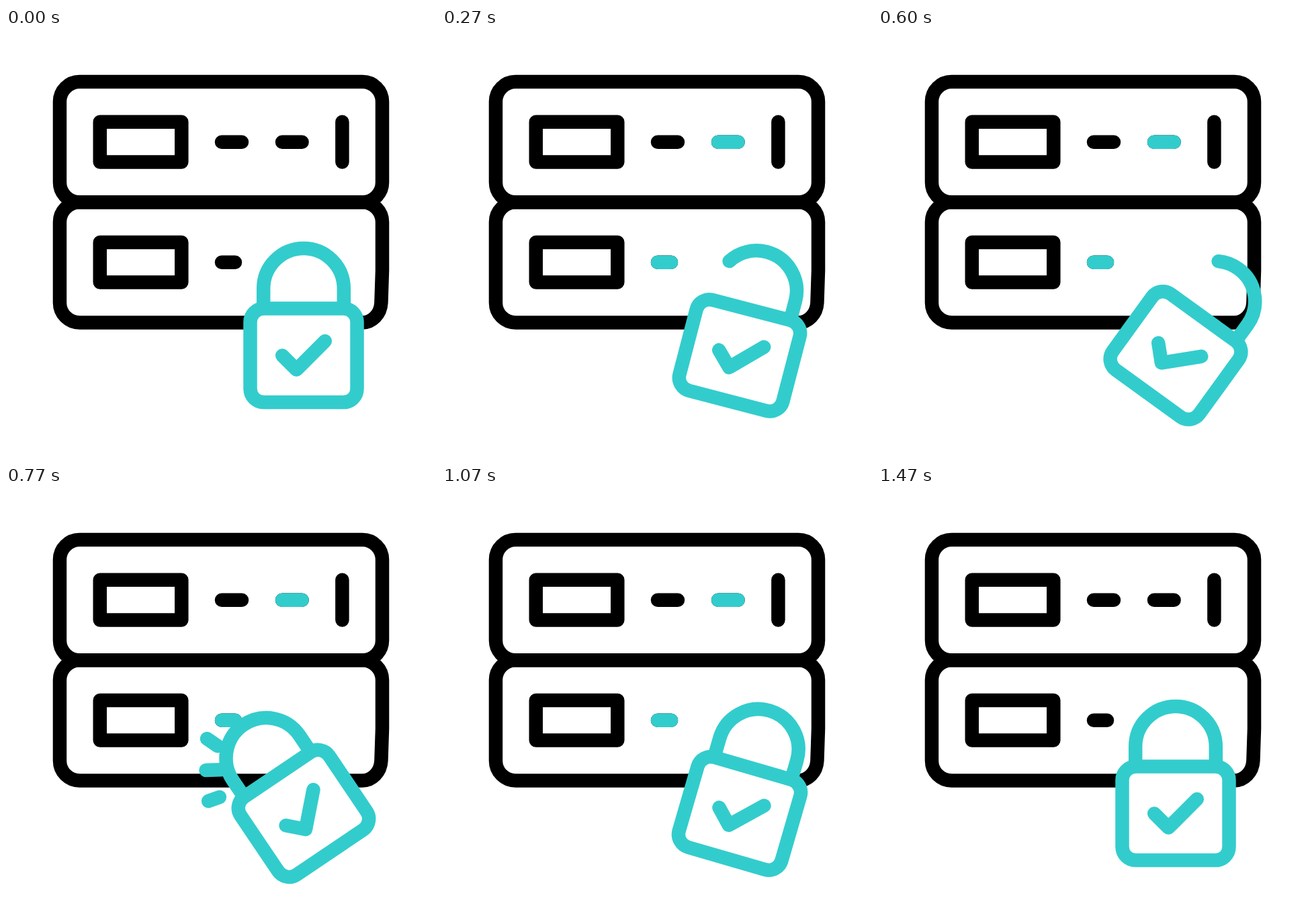
Write an HTML page that moves like this. It is 640 by 640 pixels and loops after 1.67 s.

```html
<!DOCTYPE html>
<html lang="en">
<head>
<meta charset="utf-8">
<title>Secure server</title>
<style>
  html, body { margin: 0; width: 100%; height: 100%; overflow: hidden; background: #fff; }
  svg { display: block; width: 100%; height: 100%; }
  g, path { fill: none; stroke-width: 20.5; stroke-linecap: round; stroke-linejoin: round; }
  .ink { stroke: #000; }
  .teal { stroke: #3cc; }
</style>
</head>
<body>
<svg viewBox="0 0 640 640">
  <g class="ink">
    <rect x="80" y="80" width="480" height="179.3" rx="29.5"/>
    <path d="M530.5 259.3H109.5A29.5 29.5 0 0 0 80 288.8V409A29.5 29.5 0 0 0 109.5 438.5H530
             C545 438.5 557.5 426 558.4 409L560 361V288.8A29.5 29.5 0 0 0 530.5 259.3Z"/>
    <rect x="139.8" y="139.8" width="121.5" height="59.6"/>
    <rect x="139.8" y="319" width="121.5" height="59.6"/>
    <path d="M321 169.7H351M411 169.7H440.6M500.4 139.8V199.4M321 348.8H341"/>
  </g>
  <path id="lights" class="teal" d="M411 169.7H440.6M321 348.8H341"/>
  <g id="sparks" class="teal"></g>
  <g id="lock" class="teal">
    <path id="shackle" d="M59.8-70V-99.5A59.8 59.8 0 0 0-59.8-99.5V-70"/>
    <rect x="-79.5" y="-69.8" width="159" height="139.5" rx="20" fill="#fff"/>
    <path d="M-31.8 0L-10.7 21.2L31.8-21.3"/>
  </g>
</svg>
<script>
const LOOP = 1670, STEP = 100 / 3, LAST = 42;
const $ = id => document.getElementById(id);
const lights = $('lights'), lock = $('lock'), shackle = $('shackle');
const shackleLen = shackle.getTotalLength();

// [step, value] pairs, eased in and out between neighbours
const swing = [[0, 0], [15, 41.5], [21, -34], [30, 16.2], [36, -7], [42, 0]];
const opening = [[0, 0], [10, 0.4], [15, 0.4], [21, 0]];
const sparkHead = [[19, 0], [24, 1]];
const sparkTail = [[21, 0], [27, 1]];

function ease(keys, k) {
  if (k <= keys[0][0]) return keys[0][1];
  for (let i = 1; i < keys.length; i++) {
    const [a, from] = keys[i - 1], [b, to] = keys[i];
    if (k <= b) {
      const p = (k - a) / (b - a);
      return from + (to - from) * p * p * (3 - 2 * p);
    }
  }
  return keys[keys.length - 1][1];
}

// start x, start y, direction in degrees, travel
const sparks = [[315, 387, 214.5, 55], [320, 422.3, 178, 64], [318, 463, 160.5, 51]].map(([x, y, deg, len]) => {
  const el = document.createElementNS('http://www.w3.org/2000/svg', 'path');
  $('sparks').append(el);
  const a = deg * Math.PI / 180;
  const at = p => `${x + Math.cos(a) * len * p} ${y + Math.sin(a) * len * p}`;
  return { el, at };
});

function draw(t) {
  const k = t < 100 ? 0 : Math.min(LAST, Math.floor((t - 96.5) / STEP) + 1);
  lock.setAttribute('transform', `translate(443 487.4) rotate(${ease(swing, k)})`);
  const shown = shackleLen * (1 - ease(opening, k));
  shackle.setAttribute('stroke-dasharray', shown < shackleLen ? `${shown} 999` : 'none');
  lights.setAttribute('visibility', k >= 3 && k < 34 ? 'visible' : 'hidden');

  const head = ease(sparkHead, k), tail = ease(sparkTail, k);
  for (const { el, at } of sparks) {
    el.setAttribute('d', head > tail ? `M${at(tail)}L${at(head)}` : '');
  }
}

const start = performance.now();
function tick(now) {
  draw(Math.max(0, now - start) % LOOP);
  requestAnimationFrame(tick);
}
draw(0);
requestAnimationFrame(tick);
</script>
</body>
</html>
```
